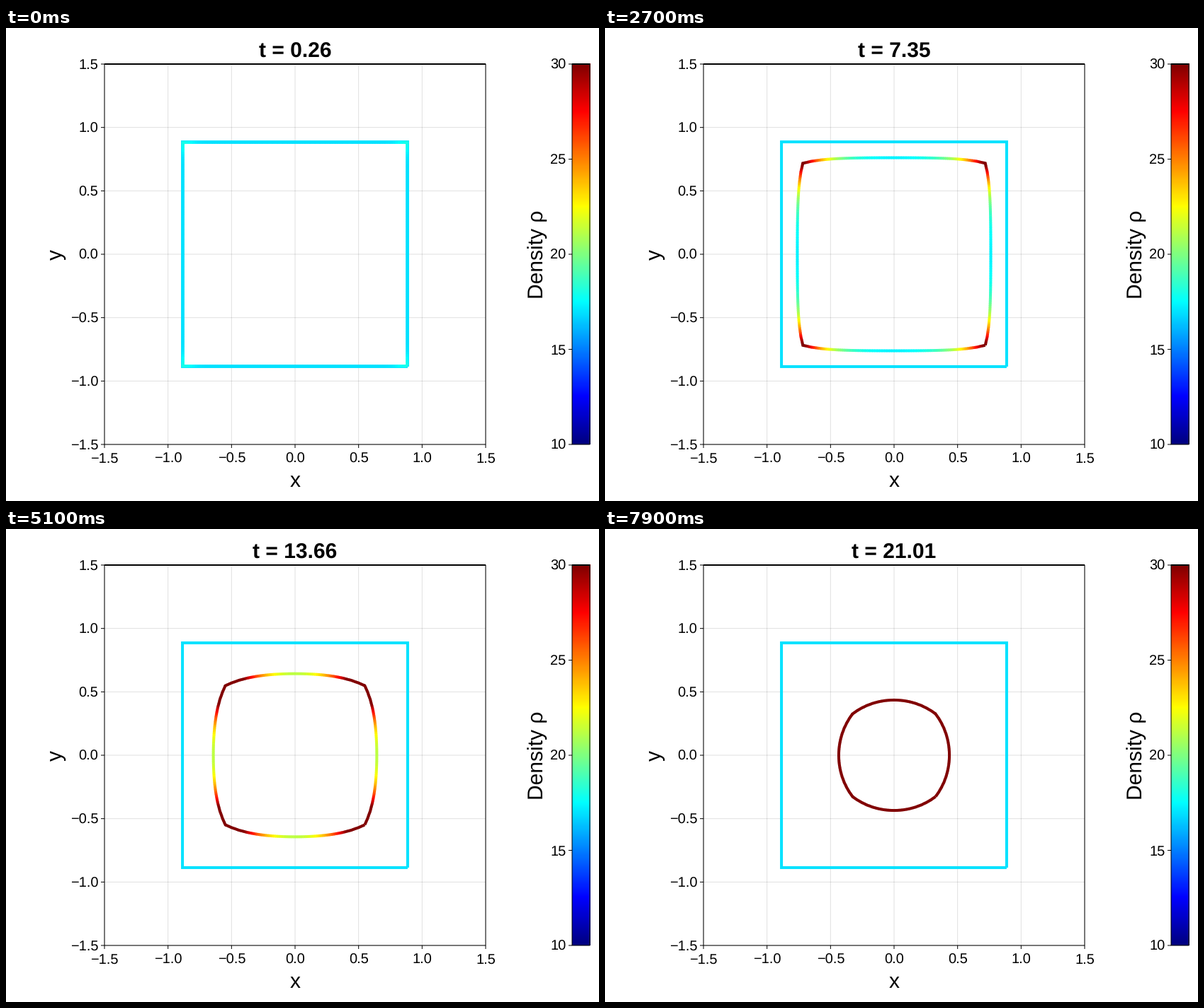
Recreate the animation shown at these times as a matplotlib script. Size 837 by 669 pixels, loop 8000 ms.

```python
import numpy as np
import matplotlib.pyplot as plt
from matplotlib.animation import FuncAnimation
from matplotlib.collections import LineCollection
from matplotlib.colors import LinearSegmentedColormap

W, H, DPI = 837, 669, 72            # at 72 dpi one point is one pixel
FRAMES, INTERVAL = 80, 100
DT = 26 / 99                        # model time per frame

HALF = np.sqrt(np.pi) / 2           # half side of the initial square
M = 15                              # cells on half a side
GROWTH, DIFFUSION = 0.001, 0.01
STEPS = 40                          # solver steps per frame
SUB = 3                             # colour steps per cell
LO, HI = 10, 30

LEFT, TOP, SIZE = 139, 51, 538      # plot square in pixels
RIGHT, BOTTOM = LEFT + SIZE, TOP + SIZE
MID_X, MID_Y = LEFT + SIZE / 2, TOP + SIZE / 2
UNIT = SIZE / 3
BAR_L, BAR_R = 799, 824

plt.rcParams.update({
    "font.family": "Liberation Sans",
    "text.hinting": "none",
})
JET = LinearSegmentedColormap.from_list("density", [
    (0, 0, .5), (0, 0, 1), (0, .5, 1), (0, 1, 1), (.5, 1, .5),
    (1, 1, 0), (1, .5, 0), (1, 0, 0), (.5, 0, 0)], N=512)


def colour(rho):
    return JET(np.clip((rho - LO) / (HI - LO), 0, 1))


def node_density(rho):
    return np.concatenate([rho[:1], (rho[:-1] + rho[1:]) / 2, rho[-1:]])


def step(x, y, dt):
    """Advance the eighth of the front between side middle and corner."""
    dx, dy = np.diff(x), np.diff(y)
    length = np.hypot(dx, dy)
    rho = 1 / length
    cx, cy = x[2:] - x[:-2], y[2:] - y[:-2]
    chord = np.hypot(cx, cy)
    tx, ty = cx / chord, cy / chord
    speed = GROWTH * node_density(rho)
    slide = DIFFUSION * (rho[:-1] - rho[1:])

    vx, vy = np.zeros(M + 1), np.zeros(M + 1)
    vx[1:-1] = speed[1:-1] * ty + slide * tx
    vy[1:-1] = -speed[1:-1] * tx + slide * ty
    vy[0] = -speed[0]
    # the corner is the mitre of two mirrored sides
    vx[-1] = vy[-1] = -speed[-1] * length[-1] / (dx[-1] - dy[-1])
    return x + dt * vx, y + dt * vy


def whole_front(x, y):
    """Mirror the eighth into an open loop from the lower right corner."""
    rho = node_density(1 / np.hypot(np.diff(x), np.diff(y)))

    def mirror(a, sign=1):
        return np.concatenate([sign * a[::-1], a[1:]])

    side = (mirror(y) + 1j * mirror(x, -1))[:-1]
    z = np.concatenate([side * 1j ** k for k in range(4)] + [side[:1]])
    r = np.concatenate([np.tile(mirror(rho)[:-1], 4), rho[-1:]])
    idx = np.arange(len(z))
    fine = np.linspace(0, idx[-1], idx[-1] * SUB + 1)
    return np.interp(fine, idx, z), np.interp(fine, idx, r)


def simulate():
    x, y = np.linspace(0, HALF, M + 1), np.full(M + 1, HALF)
    fronts = []
    for _ in range(FRAMES):
        for _ in range(STEPS):
            x, y = step(x, y, DT / STEPS)
        fronts.append(whole_front(x, y))
    return fronts


def pixels(z):
    return np.stack([MID_X + UNIT * z.real, MID_Y - UNIT * z.imag], axis=-1)


def strokes(z):
    """Short pieces, each reaching half a pixel into the next."""
    a, b = z[:-1], z[1:]
    ahead = np.append(z[2:], z[-1]) - b
    reach = 0.5 / UNIT / np.abs(b - a)
    reach[2 * M * SUB - 1::2 * M * SUB] = 1     # full joins at the corners
    return pixels(np.stack([a, b, b + reach * ahead], axis=1))


fig = plt.figure(figsize=((W + 1e-6) / DPI, (H + 1e-6) / DPI), dpi=DPI,
                 facecolor="white")
ax = fig.add_axes([0, 0, 1, 1])
ax.axis("off")


def line(xs, ys, width=1, color="black", **kw):
    ax.plot(xs, ys, color=color, linewidth=width, snap=False,
            solid_capstyle="butt", solid_joinstyle="miter", **kw)


def box(x0, x1):
    line([x0, x1, x1, x0, x0, x1], [TOP, TOP, BOTTOM, BOTTOM, TOP, TOP],
         zorder=5)


def label(x, y, text, size=20, ha="center", **kw):
    return ax.text(x, y, text, fontsize=size, ha=ha, va="baseline",
                   rotation_mode="anchor", color="black", **kw)


def left_tick(x, y, text):
    line([x - 5, x], [y, y])
    label(x - 8.5, y + 7, text, ha="right")


for v in np.linspace(-1.5, 1.5, 7):
    text = f"{v:.1f}".replace("-", "\u2212")
    x, y = MID_X + v * UNIT, MID_Y - v * UNIT
    line([x, x], [TOP, BOTTOM], alpha=0.12, zorder=1)
    line([LEFT, RIGHT], [y, y], alpha=0.12, zorder=1)
    line([x, x], [BOTTOM, BOTTOM + 5])
    label(x, 615, text)
    left_tick(LEFT, y, text)
box(LEFT, RIGHT)
label(MID_X, 649, "x", 30)
label(80, MID_Y, "y", 30, rotation=90)

ax.imshow(np.linspace(1, 0, 512)[:, None], cmap=JET, aspect="auto",
          extent=(BAR_L, BAR_R, BOTTOM, TOP))
for v in range(LO, HI + 1, 5):
    left_tick(BAR_L, BOTTOM - SIZE * (v - LO) / (HI - LO), str(v))
box(BAR_L, BAR_R)
label(758, MID_Y, "Density \u03c1", 30, rotation=90)

square = HALF * np.array([1 - 1j, 1 + 1j, -1 + 1j, -1 - 1j, 1 - 1j])
line(*pixels(square).T, width=4, color=colour(M / HALF), zorder=3)
front = LineCollection([], linewidths=4, capstyle="butt", joinstyle="miter",
                       zorder=4)
front.set_snap(False)
ax.add_collection(front, autolim=False)
title = label(MID_X, 41.5, "", 30, weight="bold")
ax.set(xlim=(0, W), ylim=(H, 0))

fronts = simulate()


def update(k):
    z, rho = fronts[k]
    front.set_segments(strokes(z))
    front.set_color(colour((rho[:-1] + rho[1:]) / 2))
    title.set_text(f"t = {(k + 1) * DT:.2f}")
    return front, title


anim = FuncAnimation(fig, update, frames=FRAMES, interval=INTERVAL,
                     repeat=True, repeat_delay=0)
plt.show()
```
